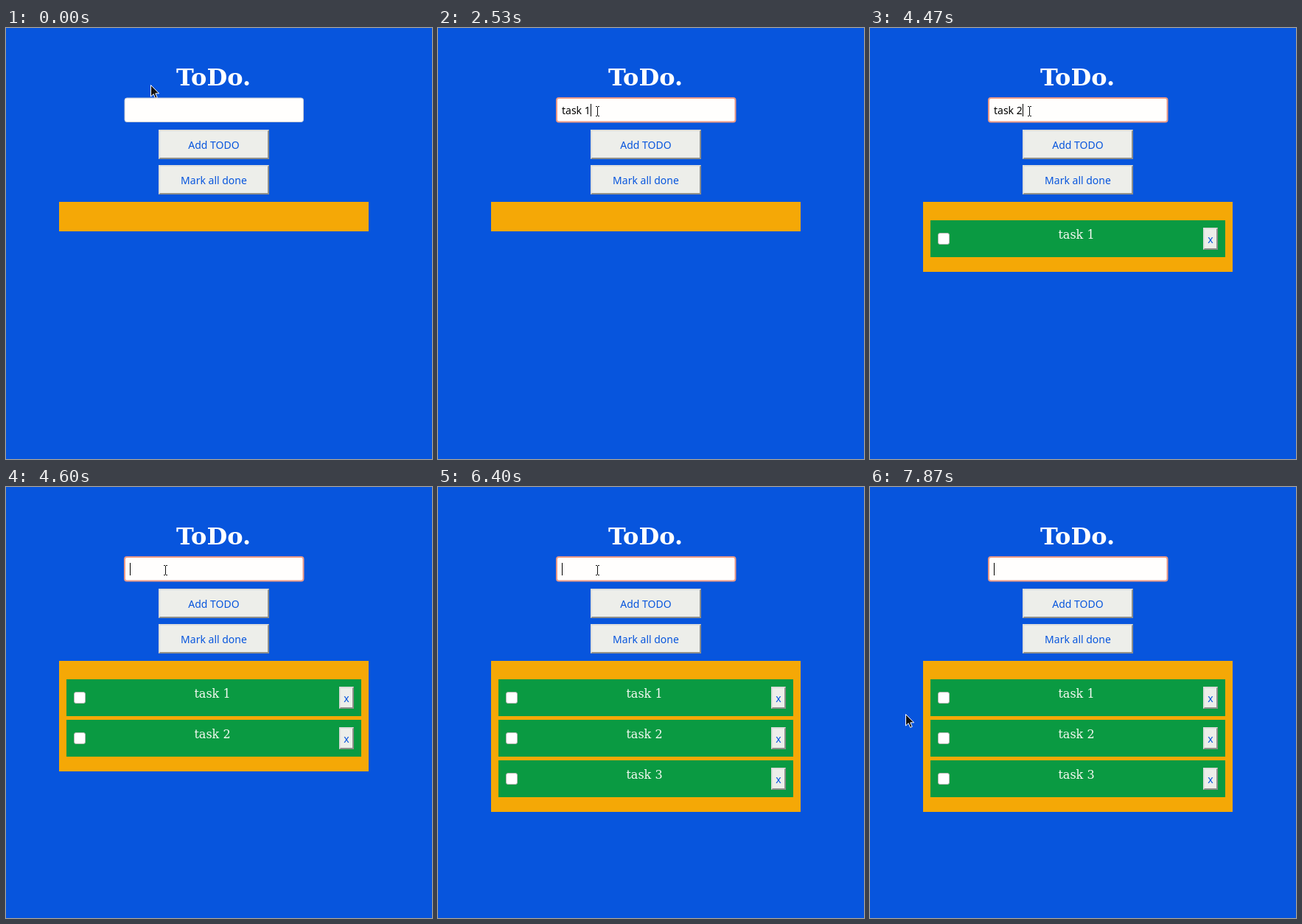
Write an HTML page that moves like this. It is 578 by 585 pixels and loops after 8000 ms.

```html
<!DOCTYPE html>
<html lang="en">
<head>
<meta charset="utf-8">
<title>ToDo</title>
<style>
html, body { margin: 0; width: 100%; height: 100%; overflow: hidden; background: #0755dd; }
svg { display: block; width: 100vw; height: 100vh; }
text { font: 14px "Noto Sans", "Open Sans", sans-serif; white-space: pre; }
.mid { text-anchor: middle; }
.btn { fill: #0755dd; }
.title { font: bold 32px "DejaVu Serif", serif; fill: #fff; }
.task { font: 16px "DejaVu Serif", serif; fill: #f6faf4; }
</style>
</head>
<body>
<svg viewBox="0 0 578 585">
  <text class="mid title" x="281.5" y="78">ToDo.</text>
  <rect id="field" x="161" y="95" width="242.5" height="32.5" rx="3" fill="#fffefd"/>
  <text id="typed" x="168" y="117"></text>
  <rect id="caret" y="103" width="1" height="17"/>
  <g id="buttons"></g>
  <rect id="panel" x="72" y="236" width="420" fill="#f5a806"/>
  <g id="rows"></g>
  <path id="arrow" fill="#111" stroke="#fff" d="M.5 .5V16L4.2 12.6 6.7 18.4 9.2 17.3 6.8 11.8H11.6Z"/>
  <path id="beam" fill="none" stroke="#111" d="M-2 -6.5H0M1 -6.5H3M.5 -6V6M-2 6.5H0M1 6.5H3"/>
</svg>
<script>
const LOOP = 8000, STEP = 1000 / 15;
const CLICK = 600, LEAVE = 7000;
const $ = id => document.getElementById(id);

// First and last key press of each task
const tasks = [[1470, 2530], [3470, 4470], [5070, 5800]];
const submitTime = i => 2800 + 1800 * i;
const keyTime = (i, k) => tasks[i][0] + (tasks[i][1] - tasks[i][0]) * k / 5;

// Pointer paths as Bezier control points
const enter = [[196, 77], [216, 113]];
const exit = [[216, 113], [760, 100], [478, 320], [48, 308]];

function bezier(points, u) {
  if (points.length === 1) return points[0];
  const a = bezier(points.slice(0, -1), u), b = bezier(points.slice(1), u);
  return a.map((v, i) => v + (b[i] - v) * u);
}

function pointer(t) {
  const now = Math.floor((t + 5) / STEP) * STEP;
  const part = (from, steps) => Math.min(1, Math.max(0, (now - from) / (steps * STEP)));
  return now < LEAVE - 5 ? bezier(enter, part(333, 3)) : bezier(exit, part(LEAVE, 13));
}

function button(x, y, w, h, label, baseline) {
  const r = x + w, b = y + h;
  return `<rect x="${x}" y="${y}" width="${w}" height="${h}" fill="#edeeea"/>
    <path fill="#dcdddb" d="M${x} ${b}V${y}H${r}l-2 2H${x + 2}V${b - 2}Z"/>
    <path fill="#8e8f8b" d="M${x} ${b}H${r}V${y}l-2 2V${b - 2}H${x + 2}Z"/>
    <text class="mid btn" x="${x + w / 2}" y="${baseline}">${label}</text>`;
}

function row(i) {
  const y = 261 + 55 * i;
  return `<g><rect x="82" y="${y}" width="400" height="50" fill="#0a9a42"/>
    <rect x="92.5" y="${y + 17.5}" width="15" height="15" rx="2.5" fill="#fff" stroke="#b5b8b2"/>
    <text class="mid task" x="280" y="${y + 25}">task ${i + 1}</text>
    ${button(452, y + 10, 20, 30, "x", y + 31)}</g>`;
}

$("buttons").innerHTML = button(207, 138, 150, 40, "Add TODO", 164) +
  button(207, 186, 150, 40, "Mark all done", 212);
$("rows").innerHTML = tasks.map((_, i) => row(i)).join("");
const rows = [...$("rows").children];

const show = (el, on) => el.setAttribute("visibility", on ? "visible" : "hidden");

function draw(t) {
  let done = 0, keys = 0, lastInput = CLICK;
  tasks.forEach((_, i) => {
    if (t >= submitTime(i)) done = i + 1;
    for (let k = 0; k < 6 && t >= keyTime(i, k); k++) {
      lastInput = keyTime(i, k);
      keys = k + 1;
    }
  });
  if (done && t < tasks[done]?.[0] || done === tasks.length) keys = 0;

  const focused = t >= CLICK;
  $("field").setAttribute("stroke", focused ? "#ec9a86" : "#c3c8d4");
  $("field").setAttribute("stroke-width", focused ? 2 : 1);
  $("typed").textContent = `task ${done + 1}`.slice(0, keys);

  // The caret blinks, but stays solid after input
  const lit = t - lastInput < 400 || t >= LEAVE || (t + 600) % 1200 >= 400;
  $("caret").setAttribute("x", 168 + Math.ceil($("typed").getComputedTextLength()));
  show($("caret"), focused && lit);

  $("panel").setAttribute("height", 40 + 55 * done);
  rows.forEach((r, i) => show(r, i < done));

  const [x, y] = pointer(t);
  const inField = x > 160 && x < 404 && y > 94 && y < 128;
  for (const id of ["arrow", "beam"]) {
    $(id).setAttribute("transform", `translate(${Math.round(x)} ${Math.round(y)})`);
    show($(id), inField === (id === "beam"));
  }
}

let start;
function tick(now) {
  start ??= now;
  draw((now - start) % LOOP);
  requestAnimationFrame(tick);
}
draw(0);
requestAnimationFrame(tick);
</script>
</body>
</html>
```
